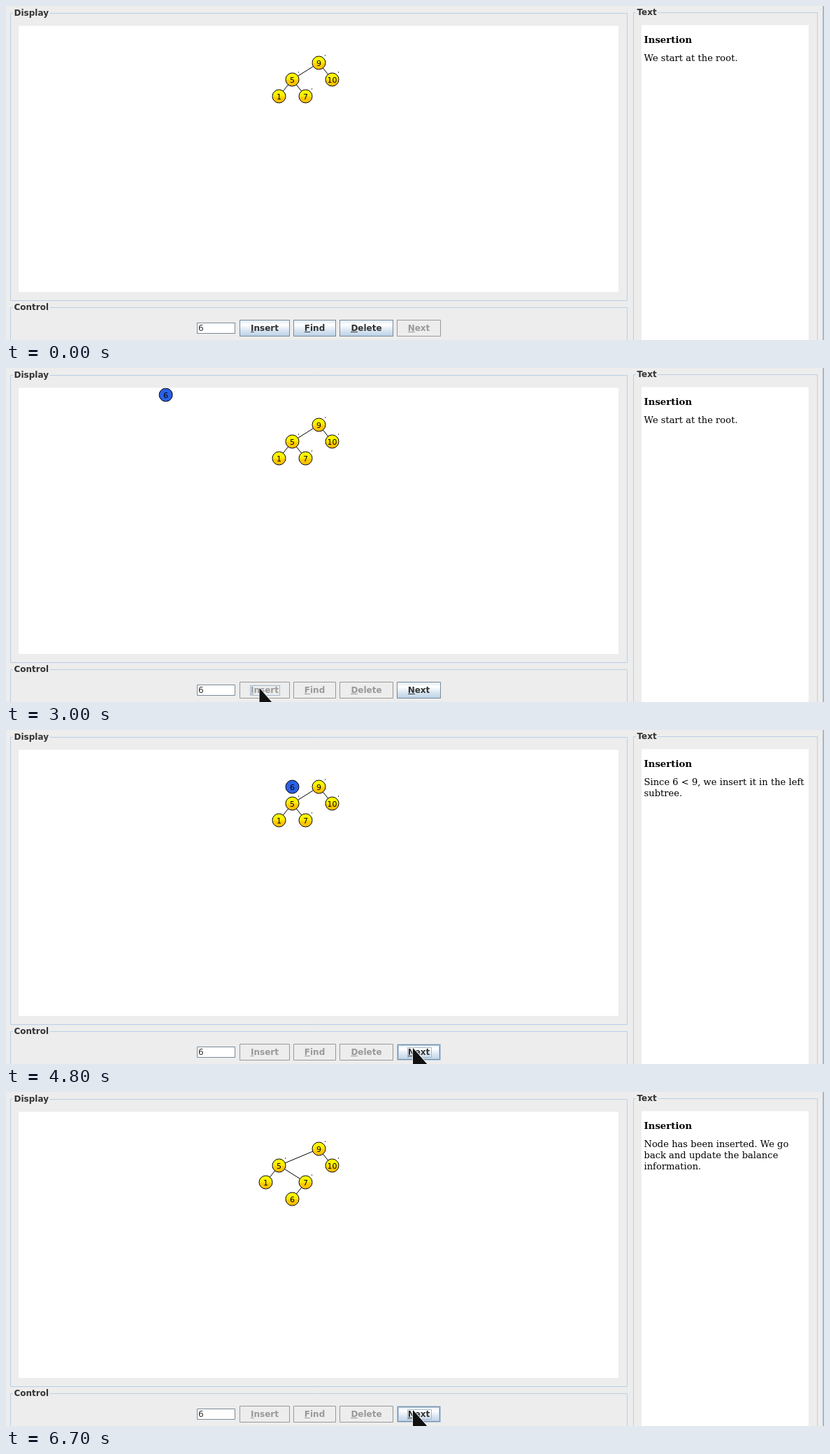
Animation, 1170 px wide and 479 px high, one loop 8 s. Source, as an HTML page with a canvas:

```html
<!DOCTYPE html>
<html lang="en">
<head>
<meta charset="utf-8">
<title>Search tree insertion</title>
<style>
html, body { margin: 0; width: 100%; height: 100%; overflow: hidden; background: #ededed; }
canvas { display: block; }
</style>
</head>
<body>
<canvas id="stage" width="1170" height="479"></canvas>
<script>
const ctx = document.getElementById('stage').getContext('2d');
const LOOP = 8000, TICK = 100;
const SANS = '"DejaVu Sans", sans-serif', SERIF = '"DejaVu Serif", serif';
const BG = '#ededed', LINE = '#b8cfe5', EDGE = '#7a8a99', INK = '#333333', DIM = '#999999';

const MESSAGES = [
  [0, ['We start at the root.']],
  [4300, ['Since 6 < 9, we insert it in the left', 'subtree.']],
  [5300, ['Since 6 > 5, we insert it in the', 'right subtree.']],
  [6300, ['Node has been inserted. We go', 'back and update the balance', 'information.']]
];

// Each track: [start, end, from, to]; the first tick already moves.
const NEW_NODE = [
  [2800, 3252, [-32, 16], [447.5, 57.5]],
  [4300, 4800, [447.5, 57.5], [409.5, 81.5]],
  [5300, 5700, [409.5, 81.5], [428.5, 105.5]],
  [6300, 6700, [428.5, 105.5], [409.5, 153.5]]
];
const POINTER = [
  [700, 1100, [309, 481], [288, 457]],
  [1800, 2200, [288, 457], [362.5, 459]],
  [3200, 3600, [362.5, 459], [582, 456]]
];

const progress = (t, a, b) => Math.min(1, Math.max(0, (t - a + TICK) / (b - a + TICK)));
const lerp = (a, b, k) => a + (b - a) * k;
const within = (t, a, b) => t >= a && t < b;

function follow(track, t) {
  const leg = track.filter(l => t >= l[0]).pop();
  if (!leg) return null;
  const [start, end, from, to] = leg;
  const k = progress(t, start, end);
  return [lerp(from[0], to[0], k), lerp(from[1], to[1], k)];
}

function rect(x, y, w, h, color) {
  ctx.fillStyle = color;
  ctx.fillRect(x, y, w, h);
}

function frame(x, y, w, h, color) {
  ctx.strokeStyle = color;
  ctx.lineWidth = 1;
  ctx.strokeRect(x + .5, y + .5, w - 1, h - 1);
}

function label(str, x, y, font, color, align = 'left') {
  ctx.font = font;
  ctx.textAlign = align;
  ctx.fillStyle = color;
  ctx.fillText(str, x, y);
}

function group(title, x, y, w, h) {
  frame(x, y, w, h, LINE);
  const font = 'bold 12px ' + SANS;
  ctx.font = font;
  rect(x + 4, y - 2, ctx.measureText(title).width + 3, 5, BG);
  label(title, x + 5.5, y + 4, font, INK);
}

function button(text, x, w, { enabled, hover, pressed, focus }) {
  const y = 450, h = 24, font = 'bold 12px ' + SANS;
  if (pressed) {
    rect(x, y, w, h, LINE);
    rect(x, y, w, 2, EDGE);
    rect(x, y, 2, h, EDGE);
  } else if (enabled) {
    const g = ctx.createLinearGradient(0, y, 0, y + h);
    g.addColorStop(0, '#dde8f3');
    g.addColorStop(.3, '#ffffff');
    g.addColorStop(.6, '#dde8f3');
    g.addColorStop(1, LINE);
    rect(x, y, w, h, g);
  }
  if (enabled && hover && !pressed) {
    frame(x, y, w, h, LINE);
    frame(x + 1, y + 1, w - 2, h - 2, EDGE);
    frame(x + 2, y + 2, w - 4, h - 4, LINE);
  } else {
    frame(x, y, w, h, enabled ? EDGE : DIM);
  }
  ctx.font = font;
  const tw = ctx.measureText(text).width, tx = x + (w - tw) / 2;
  const color = enabled ? INK : DIM;
  label(text, tx, 466, font, color);
  rect(Math.round(tx), 467, ctx.measureText(text[0]).width, 1, color);
  if (focus && !pressed) frame(Math.round(tx) - 1, 455, Math.round(tw) + 3, 15, '#a3b8cc');
}

function edge(a, b) {
  ctx.strokeStyle = '#000';
  ctx.lineWidth = 1;
  ctx.beginPath();
  ctx.moveTo(...a);
  ctx.lineTo(...b);
  ctx.stroke();
}

function node(text, [x, y], { blue, dot } = {}) {
  const g = ctx.createLinearGradient(0, y - 10, 0, y + 10);
  g.addColorStop(0, '#ffff00');
  g.addColorStop(.45, '#ffee00');
  g.addColorStop(.6, '#ffcc00');
  g.addColorStop(1, '#ffbb00');
  ctx.beginPath();
  ctx.arc(x, y, 9.5, 0, Math.PI * 2);
  ctx.fillStyle = blue ? '#2b60e4' : g;
  ctx.fill();
  ctx.strokeStyle = '#000';
  ctx.lineWidth = 1;
  ctx.stroke();
  label(text, x, y + 4, '11px ' + SANS, '#000', 'center');
  if (dot) rect(x + 8.5, y - 11.5, 1, 2, '#555');
}

function tree(t) {
  const k = t < 6300 ? 0 : progress(t, 6300, 6700);
  const n9 = [447.5, 81.5], n10 = [466.5, 105.5], n7 = [428.5, 129.5];
  const n5 = [lerp(409.5, 390.5, k), 105.5], n1 = [lerp(390.5, 371.5, k), 129.5];
  const n6 = follow(NEW_NODE, t), placed = t >= 6300;

  ctx.save();
  ctx.beginPath();
  ctx.rect(18, 28.5, 858, 381.5);
  ctx.clip();
  edge(n9, n5);
  edge(n9, n10);
  edge(n5, n1);
  edge(n5, n7);
  if (placed) edge(n7, n6);
  node('9', n9, { dot: true });
  node('10', n10, { dot: true });
  node('5', n5, { dot: true });
  node('1', n1);
  node('7', n7, { dot: true });
  if (n6) node('6', n6, { blue: !placed });
  ctx.restore();
}

function beam(x, y) {
  const path = new Path2D();
  for (const s of [-1, 1]) {
    path.moveTo(x - 6, y + s * 19);
    path.quadraticCurveTo(x, y + s * 19, x, y + s * 14);
    path.quadraticCurveTo(x, y + s * 19, x + 6, y + s * 19);
  }
  path.moveTo(x, y - 15);
  path.lineTo(x, y + 15);
  for (const [color, width] of [['#fff', 5.5], ['#111', 3]]) {
    ctx.strokeStyle = color;
    ctx.lineWidth = width;
    ctx.stroke(path);
  }
}

function arrow(x, y) {
  const points = [[0, 0], [0, 32], [7, 26], [12, 38], [18, 35], [13, 25], [22, 25]];
  ctx.beginPath();
  points.forEach(([px, py]) => ctx.lineTo(x + px, y + py));
  ctx.closePath();
  ctx.lineJoin = 'round';
  ctx.strokeStyle = '#fff';
  ctx.lineWidth = 1.5;
  ctx.stroke();
  ctx.fillStyle = '#111';
  ctx.fill();
}

function draw(t) {
  const at = follow(POINTER, t);
  const over = (x, w) => !!at && at[0] >= x && at[0] < x + w;
  const idle = t < 2800;

  rect(0, 0, 1170, 479, BG);
  rect(1168, 0, 2, 479, '#a3b8cc');
  group('Display', 6, 10, 883, 413);
  group('Control', 6, 432, 883, 80);
  group('Text', 897, 9, 264, 500);
  rect(18, 28.5, 858, 381.5, '#fff');
  rect(909, 27.5, 239, 460, '#fff');

  label('Insertion', 912.5, 53, 'bold 13.3px ' + SERIF, '#000');
  const lines = MESSAGES.filter(m => t >= m[0]).pop()[1];
  lines.forEach((s, i) => label(s, 912.5, 79 + i * 16, '13.1px ' + SERIF, '#000'));

  tree(t);

  rect(273, 454, 55, 16, '#fff');
  frame(273, 454, 55, 16, EDGE);
  if (within(t, 1300, 2500)) rect(275, 455, 7, 14, LINE);
  label('6', 275, 466, '12px ' + SANS, INK);

  button('Insert', 334, 72, {
    enabled: idle, hover: over(334, 72),
    pressed: within(t, 2400, 2800), focus: within(t, 2500, 4000)
  });
  button('Find', 411, 61, { enabled: idle });
  button('Delete', 477, 77, { enabled: idle });
  button('Next', 559, 63, {
    enabled: !idle, hover: over(559, 63),
    pressed: within(t, 4000, 4300) || within(t, 5200, 5300) || within(t, 6100, 6300),
    focus: t >= 4000
  });

  if (at) (at[0] < 328 ? beam : arrow)(...at);
}

const begin = performance.now();
function tick() {
  const t = (performance.now() - begin) % LOOP;
  draw(Math.floor(t / TICK) * TICK);
  requestAnimationFrame(tick);
}
tick();
</script>
</body>
</html>
```
